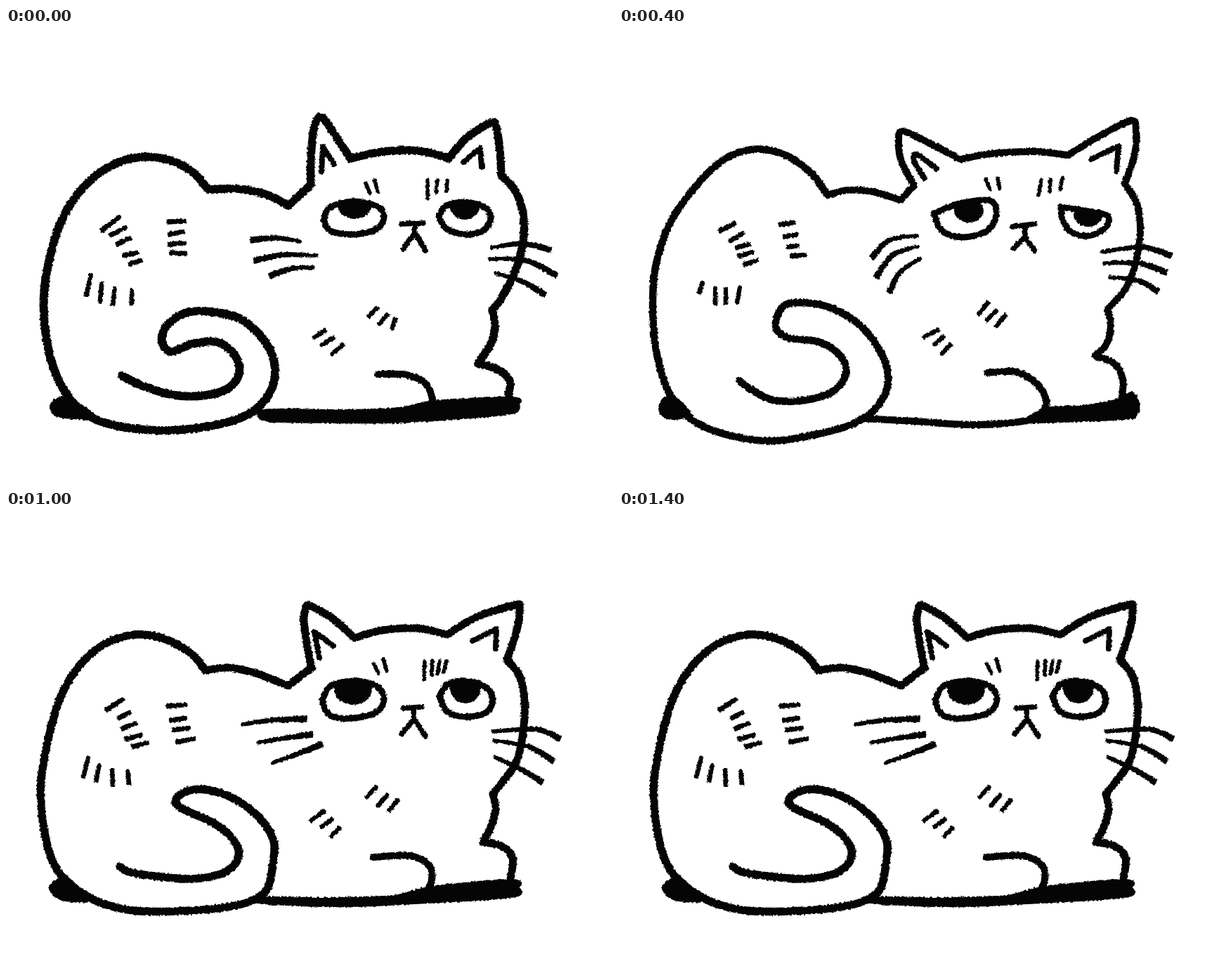
Recreate the animation shown at these times as an HTML page. Size 864x648 px, loop 1600 ms.

```html
<!DOCTYPE html>
<html lang="en">
<head>
<meta charset="utf-8">
<title>Grumpy cat</title>
<style>
html, body { margin: 0; width: 100%; height: 100%; overflow: hidden; background: #fff; }
svg { display: block; width: 100vw; height: 100vh; }
</style>
</head>
<body>
<svg id="stage" viewBox="0 0 864 648" stroke-linecap="round" stroke-linejoin="round">
  <filter id="crayon" x="0" y="0" width="864" height="648" filterUnits="userSpaceOnUse" color-interpolation-filters="sRGB">
    <feTurbulence type="fractalNoise" baseFrequency="0.3" numOctaves="2" seed="4"/>
    <feDisplacementMap in="SourceGraphic" scale="4" xChannelSelector="R" yChannelSelector="G"/>
  </filter>
</svg>
<script>
const stage = document.getElementById('stage');
const INK = '#050505';

// Point strings: "/" is a sharp corner, "|" lifts the pen.
const up = {
  width: 12,
  body: '288 230 265 205 232 188 190 184 150 196 112 225 82 268 64 320 54 380 57 440 72 495 98 536 140 562 215 573 290 567 345 550 375 520 383 485 370 448 335 415 290 404 255 406 228 425 222 447 235 461 265 450 300 447 325 465 332 490 318 512 285 523 240 523 195 510 165 495',
  head: '288 230 330 229 370 237 402 253 / 418 238 434 224 / 434 185 439 140 449 127 464 146 490 186 / 530 177 570 174 605 178 630 186 / 655 157 690 135 698 142 703 175 705 210 / 725 232 736 265 736 305 724 348 705 385 692 402 / 696 425 690 450 672 478 / 700 486 717 503 715 522',
  leg: '529 493 570 494 598 507 608 532',
  ground: ['63 539 72 528 92 528 130 556 95 556 70 552', '358 549 380 543 480 544 560 541 610 531 720 526 731 537 720 549 650 556 560 562 460 562 375 560'],
  ears: '449 205 / 451 169 / 467 194 | 651 191 675 171 / 677 198',
  eyes: ['452 272 462 255 495 247 528 254 538 269 528 286 495 294 462 289 452 272', '616 268 627 253 655 248 682 256 690 271 680 288 655 294 627 286 616 268'],
  pupils: [[496, 250, 25, 22], [653, 251, 22, 22]],
  nose: '563 279 594 278 | 583 280 581 293 | 566 315 574 302 583 293 / 597 317',
  brow: '512 221 518 235 | 525 217 529 233 | 600 217 600 243 | 614 217 612 234 | 628 217 627 232',
  marks: '136 288 162 269 | 149 295 170 284 | 158 308 177 299 | 167 324 187 320 | 176 336 193 331 | 231 276 255 275 | 232 294 253 290 | 232 308 255 306 | 234 320 256 321',
  flecks: '121 351 114 381 | 136 363 134 390 | 155 370 152 394 | 179 373 179 394 | 438 441 454 431 | 449 452 466 441 | 463 465 480 451 | 516 411 528 399 | 531 422 543 408 | 550 428 554 414',
  whiskers: '349 302 385 299 419 304 | 354 331 395 323 443 324 | 376 353 405 343 438 341 | 775 316 735 307 691 313 | 783 352 740 331 688 329 | 767 380 735 361 696 349'
};

const rising = {
  width: 11.5,
  body: '284 227 262 202 225 182 185 176 145 187 108 216 78 264 60 325 50 385 52 440 66 498 92 532 130 556 180 569 240 570 300 566 345 557 372 538 380 500 381 470 362 438 325 410 285 397 255 400 241 414 255 426 300 447 328 475 328 500 305 517 265 524 220 521 175 514 162 506',
  head: '284 227 315 223 355 231 402 249 / 418 236 435 224 / 428 188 424 155 427 138 433 135 465 153 496 181 / 535 170 585 167 628 176 / 670 151 724 134 731 138 727 170 713 212 / 731 235 738 270 736 315 725 360 693 403 / 697 425 690 450 679 472 / 705 477 721 494 718 525',
  leg: '522 493 575 491 603 506 605 530 590 548',
  ground: ['62 538 72 526 88 527 125 554 80 554', '345 556 365 550 450 551 550 548 605 535 720 525 731 537 720 550 600 558 500 563 420 562'],
  ears: '446 209 439 172 / 466 192 | 664 185 698 168 / 697 196',
  eyes: ['450 270 461 250 494 242 527 249 538 267 528 286 494 295 461 291 450 270', '617 264 628 247 655 242 683 251 693 269 683 287 656 293 628 286 617 264'],
  pupils: [[494, 254, 27, 22], [654, 252, 22, 22]],
  nose: '566 281 592 279 | 580 280 581 295 | 563 318 581 296 / 597 321',
  brow: '524 218 530 231 | 537 211 542 228 | 596 215 595 240 | 607 214 606 233 | 617 214 614 232 | 627 213 623 229',
  marks: '143 283 167 268 | 160 295 176 287 | 165 310 185 302 | 171 325 193 319 | 180 336 202 330 | 230 278 256 276 | 234 298 256 295 | 238 312 261 309 | 243 329 269 324',
  flecks: '117 351 110 379 | 133 361 128 385 | 151 368 152 391 | 173 370 175 389 | 434 441 453 427 | 449 450 464 439 | 462 464 475 451 | 513 408 527 393 | 529 420 543 404 | 545 427 558 411',
  whiskers: '427 296 380 298 336 304 | 436 318 400 323 358 330 | 449 332 415 346 379 359 | 788 324 755 311 693 314 | 779 356 745 336 694 327 | 763 386 735 369 695 350'
};

const falling = {
  width: 10.5,
  body: '297 238 272 205 232 179 188 173 148 188 108 227 72 279 52 340 48 400 53 460 66 508 82 535 110 562 160 581 218 588 280 579 335 563 367 540 383 505 375 467 345 425 300 398 255 391 232 398 223 425 240 441 285 447 315 467 323 492 305 517 265 530 220 530 190 516 171 502',
  head: '297 238 325 231 360 233 401 245 / 420 224 / 402 190 398 160 404 147 440 163 486 187 / 530 179 590 176 640 181 / 680 156 728 132 736 145 734 180 720 222 / 737 250 742 290 735 335 722 370 695 401 / 700 422 694 450 678 467 / 705 478 717 500 716 525',
  leg: '524 491 565 490 595 507 608 530 605 545 | 345 556 420 560 500 565 575 560 605 545',
  ground: ['57 540 65 526 80 526 102 550 80 557 63 553', '575 560 610 541 660 538 705 530 730 519 740 535 737 551 720 557 600 562'],
  ears: '435 214 420 190 424 180 451 200 | 672 187 711 168 / 708 204',
  eyes: ['448 264 485 250 528 246 537 265 525 288 490 298 460 289 448 264', '629 255 660 260 695 267 692 285 668 296 643 290 631 272 629 255'],
  pupils: [[498, 260, 21, 17], [668, 266, 21, 17]],
  nose: '560 283 592 279 | 577 283 578 297 | 561 314 578 298 / 592 317',
  brow: '522 215 528 230 | 539 214 542 229 | 601 217 597 238 | 614 216 613 233 | 631 214 628 230',
  marks: '143 289 165 278 | 158 303 177 292 | 167 313 186 308 | 171 325 190 319 | 178 337 197 331 | 229 280 249 277 | 235 297 254 294 | 240 312 255 310 | 245 325 266 323',
  flecks: '119 362 114 377 | 137 370 137 393 | 152 371 152 392 | 172 369 168 391 | 434 440 454 430 | 449 451 462 439 | 459 464 472 451 | 512 408 525 391 | 523 417 537 402 | 537 425 550 409',
  whiskers: '360 327 385 302 425 296 | 366 355 390 323 426 311 | 385 376 400 348 429 328 | 785 324 745 312 687 319 | 779 348 740 335 690 335 | 767 375 740 360 698 355'
};

const glare = {
  width: 11,
  body: '291 232 270 206 230 186 185 178 145 193 105 232 70 283 50 345 43 415 50 470 67 515 97 545 135 570 190 586 250 582 300 567 345 550 370 522 377 480 355 435 320 393 290 371 265 369 253 384 275 414 305 455 312 490 298 513 260 526 215 524 175 514 147 502',
  head: '291 232 320 223 355 223 395 243 / 411 230 / 407 185 413 140 420 132 455 148 486 186 / 530 172 590 165 640 174 / 670 142 705 110 720 118 728 155 731 225 / 744 265 742 310 728 350 695 389 / 704 415 698 445 680 469 / 712 475 725 500 718 525',
  leg: '521 492 560 490 590 503 603 527 598 550 580 562 | 340 555 440 557 540 563 580 562',
  ground: ['51 540 58 529 75 528 108 551 80 556 58 553', '600 541 690 540 715 529 738 524 742 540 733 556 690 561 600 559'],
  ears: '430 211 429 175 / 450 193 | 672 188 693 156 / 704 194',
  eyes: ['449 273 490 256 532 240 / 538 265 528 290 495 301 465 293 449 273', '625 243 660 256 694 274 / 685 293 660 299 638 285 626 265 625 243'],
  pupils: [[497, 264, 16, 16], [659, 267, 16, 16]],
  nose: '567 285 592 282 | 578 286 578 298 | 561 324 578 300 / 591 318',
  brow: '533 211 538 224 | 546 207 551 222 | 597 213 598 230 | 614 211 613 228 | 631 208 628 225',
  marks: '142 295 158 283 | 155 305 172 293 | 168 316 179 305 | 175 327 188 318 | 184 339 203 330 | 226 280 253 279 | 238 299 253 297 | 238 314 254 310 | 248 332 265 325',
  flecks: '116 357 110 381 | 134 362 131 390 | 149 368 148 391 | 168 368 168 391 | 437 443 451 431 | 449 452 462 441 | 461 463 474 453 | 511 407 522 397 | 522 415 531 403 | 535 420 543 406 | 548 426 553 410',
  whiskers: '353 325 385 308 428 303 | 355 352 385 332 441 322 | 385 374 410 350 442 332 | 817 319 760 306 694 319 | 800 351 760 336 698 337 | 768 385 740 363 693 356'
};

function points(text) {
  const n = text.trim().split(/\s+/).map(Number);
  return n.filter((_, i) => i % 2 === 0).map((x, i) => [x, n[2 * i + 1]]);
}

// Catmull-Rom spline as cubic segments
function spline(pts, closed) {
  const last = pts.length - 1;
  const at = i => closed ? pts[(i + pts.length) % pts.length] : pts[Math.max(0, Math.min(last, i))];
  let d = '';
  for (let i = 0; i < (closed ? pts.length : last); i++) {
    const [a, b, c, e] = [at(i - 1), at(i), at(i + 1), at(i + 2)];
    d += `C${b[0] + (c[0] - a[0]) / 6} ${b[1] + (c[1] - a[1]) / 6} ${c[0] - (e[0] - b[0]) / 6} ${c[1] - (e[1] - b[1]) / 6} ${c[0]} ${c[1]}`;
  }
  return d;
}

function line(text) {
  return text.split('|').map(stroke => {
    let pen = null;
    return stroke.split('/').map(part => {
      const pts = points(part);
      const start = pen ? '' : 'M' + pts[0];
      if (pen) pts.unshift(pen);
      pen = pts[pts.length - 1];
      return start + spline(pts);
    }).join('');
  }).join('');
}

function blob(text) {
  const pts = points(text);
  return 'M' + pts[0] + spline(pts, true) + 'Z';
}

// Strokes that run from thick to thin
function tapered(text, thick, thin) {
  return text.split('|').map(stroke => {
    const pts = points(stroke), last = pts.length - 1;
    const side = sign => pts.map(([x, y], i) => {
      const a = pts[Math.max(0, i - 1)], b = pts[Math.min(last, i + 1)];
      const dx = b[0] - a[0], dy = b[1] - a[1], len = Math.hypot(dx, dy);
      const r = sign * (thick + (thin - thick) * i / last) / 2;
      return [x - dy / len * r, y + dx / len * r];
    });
    const left = side(1), right = side(-1).reverse();
    return 'M' + left[0] + spline(left) + 'L' + right[0] + spline(right) + 'Z';
  }).join('');
}

function add(parent, tag, attrs) {
  const el = document.createElementNS('http://www.w3.org/2000/svg', tag);
  for (const key in attrs) el.setAttribute(key, attrs[key]);
  return parent.appendChild(el);
}

function draw(pose, id) {
  const g = add(stage, 'g', { filter: 'url(#crayon)', fill: 'none', stroke: INK });
  const ink = (d, width, fill = 'none') => add(g, 'path', { d, fill, 'stroke-width': width });
  pose.ground.forEach(shape => ink(blob(shape), 2, INK));
  ink(line(pose.body), pose.width);
  ink(line(pose.head), pose.width - 0.5);
  ink(line(pose.leg), 10);
  ink(line(pose.ears), 8);
  pose.eyes.forEach((eye, i) => {
    const d = line(eye) + 'Z', clip = `eye${id}-${i}`;
    const [cx, cy, rx, ry] = pose.pupils[i];
    add(add(g, 'clipPath', { id: clip }), 'path', { d });
    add(g, 'ellipse', { cx, cy, rx, ry, fill: INK, stroke: 'none', 'clip-path': `url(#${clip})` });
    ink(d, 9);
  });
  ink(line(pose.nose), 7.5);
  ink(line(pose.brow), 5.5);
  ink(tapered(pose.marks, 3.5, 2.5), 4, INK);
  ink(tapered(pose.flecks, 2, 3), 4, INK);
  ink(tapered(pose.whiskers, 6, 2), 3.5, INK);
  return g;
}

const cats = [up, rising, falling, glare].map(draw);
const order = [0, 1, 2, 3, 2, 1, 0, 1];
const STEP = 200;

function show(time) {
  const now = order[Math.floor(time / STEP) % order.length];
  cats.forEach((cat, i) => cat.setAttribute('display', i === now ? 'inline' : 'none'));
}

const begin = performance.now();
function tick() {
  show(performance.now() - begin);
  requestAnimationFrame(tick);
}
tick();
</script>
</body>
</html>
```
